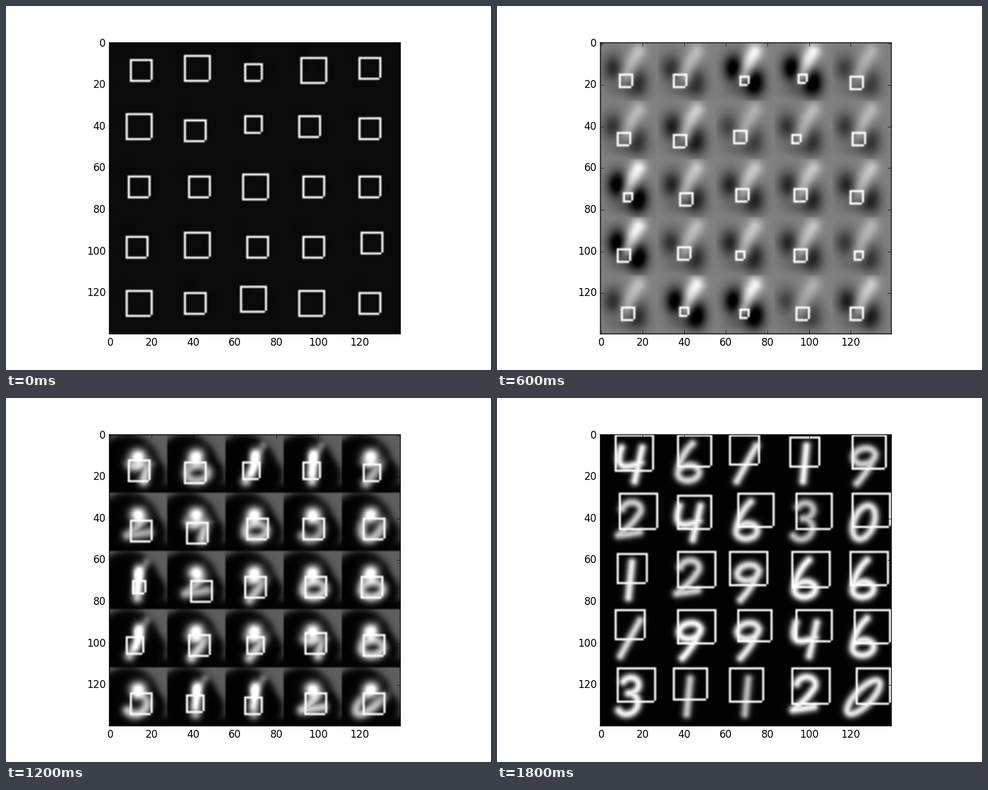
Recreate the animation shown at these times as a matplotlib script. Size 800 by 600 pixels, loop 2000 ms.

```python
import numpy as np
import matplotlib.pyplot as plt
from matplotlib.animation import FuncAnimation

plt.style.use("classic")
plt.rcParams.update({"font.family": "DejaVu Sans", "font.size": 12})

CELL, GRID, FRAMES = 28, 5, 10
Y, X = np.mgrid[0:CELL, 0:CELL].astype(float)
rng = np.random.default_rng(4)

# "/" is a leaning 1 and "O" a leaning 0
LABELS = "461/9" "24630" "12966" "/9946" "3112O"
LABELS = LABELS.replace("461/9", "46/19")


def bend(start, control, end):
    """Quadratic curve as sampled points."""
    t = np.linspace(0, 1, 40)[:, None]
    p, q, r = np.array([start, control, end], float)
    return (1 - t)**2 * p + 2 * t * (1 - t) * q + t**2 * r


def arc(cx, cy, rx, ry, start=0, end=360):
    a = np.radians(np.linspace(start, end, 60))
    return np.stack([cx + rx * np.cos(a), cy + ry * np.sin(a)], axis=1)


GLYPHS = {
    "0": [arc(14.5, 13.8, 5, 8)],
    "1": [bend((14, 5), (14, 13), (14, 22))],
    "2": [arc(14, 8, 4.5, 3.8, -170, 40), bend((17.5, 10.5), (15, 15), (9, 20)),
          bend((9, 20), (14, 19.5), (19, 18.5))],
    "3": [arc(13.5, 8.2, 4, 3.7, -150, 80), arc(13, 17, 5, 5, -90, 140)],
    "4": [bend((9, 6), (6, 19), (19, 13)), bend((19, 6), (18, 14), (17, 22))],
    "6": [bend((15, 4), (10, 9), (9.5, 17)), arc(14.5, 18, 5, 3.7)],
    "9": [arc(14, 10, 5, 3.8), bend((19, 9), (17.5, 17), (13, 23))],
}
GLYPHS["/"], GLYPHS["O"] = GLYPHS["1"], GLYPHS["0"]
SLANT = {"/": .55, "O": .75, "0": .25, "1": .1, "9": .2}


def distance2(*strokes):
    """Squared distance of every pixel to the nearest stroke point."""
    pts = np.vstack(strokes)
    dx = X[..., None] - pts[:, 0]
    dy = Y[..., None] - pts[:, 1]
    return (dx**2 + dy**2).min(axis=2)


def glow(d2, sigma):
    return np.exp(-d2 / (2 * sigma**2))


def blob(x, y, sx, sy):
    return np.exp(-((X - x) / sx)**2 / 2 - ((Y - y) / sy)**2 / 2)


def soft(v):
    return 1 / (1 + np.exp(-np.clip(v, -40, 40)))


def disc(x, y, radius):
    return soft((radius - np.hypot(X - x, Y - y)) / .9)


class Cell:
    def __init__(self, label):
        self.slim = label in "1/"
        lean = SLANT.get(label, .1)
        self.shape = distance2(*[
            np.stack([p[:, 0] + lean * (13.5 - p[:, 1]), p[:, 1]], axis=1)
            for p in GLYPHS[label]])
        self.ink = rng.uniform(.65, .9)
        self.strength = 1.2 if self.slim else rng.uniform(.45, .8)
        self.drift = rng.normal(0, .8, (3, 3))

    def window(self, step):
        """Left, top and size of the attention window."""
        def path(*values):
            return np.interp(step, (0, 1, 2, 3, 5, 7, 9), values)

        cx = path(13.4, 13.1, 12.4, 11.4, 13.4, 15.6, 17.5)
        cy = path(12.8, 12.7, 13.8, 17.8, 20, 14.5, 7.5)
        size = path(10.4, 8.8, 6.4, 5.5, 8.4, 10.5, 17.2)
        if self.slim:
            cx += path(0, .4, .8, 1.2, -.6, -2.3, -3.2)
            size -= path(0, .7, 1.4, 1.5, 2.4, 2.2, 3)
        dx, dy, ds = [np.interp(step, (0, 4, 9), d) for d in self.drift.T]
        size = 2 * round((size + ds) / 2)
        return round(cx + dx - size / 2), round(cy + dy - size / 2), size

    def early(self, step):
        """Flat grey with a bright streak between two dark lobes."""
        full = step == 3
        k = self.strength if full else self.strength**1.6
        base = (.04, .148, .39, .5)[step]
        amp = (.01, .15, .6, 1)[step] * k
        lift, grow = (0, 1.15) if full else (6, .85)
        streak = glow(distance2(bend((13, 15 - lift * .7), (14, 10 - lift * .7),
                                     (18, 4))), 2.3 * grow)
        left = 3.2 + 4 * self.strength + lift * .2
        dark = (blob(left, 12 - lift, 3 * grow, 4 * grow)
                + blob(17.8 + lift * .2, 18.5 - lift, 3 * grow, 4 * grow))
        img = base + amp * (.4 * streak - .52 * dark)
        if full:
            img -= .1 * blob(12, 23, 6, 2.2)
        return img

    def late(self, step):
        """Dark lobes fill the cell while the digit sharpens."""
        def at(*values):
            return np.interp(step, (5, 7, 9), values)

        left = disc(at(7, 10, 10), at(14, 15, 15), at(9.7, 20.5, 45))
        right, floor = disc(19, 19, 8), soft((Y - 23) / .9)
        img = at(.5, .22, 0) * (1 - left) * (1 - right) * (1 - floor)

        streak = glow(distance2(bend((12.5, 18), (13.5, 12), (17.5, 5))), 1.5)
        img += at(.8 if self.slim else .08, 0, 0) * streak
        sx, sy = (1.7, 2.6) if self.slim else (2.7, 2.6)
        head = blob(at(13, 13.8, 14), at(12.3, 8, 6), sx, sy)
        img += at(1.1, 1.1, 0) * head
        fade = soft((Y - at(16, 10, -20)) / 1.5)
        return img + at(.8, 1, 1.1) * self.ink * fade * glow(
            self.shape, at(2, 1.8, 1.5)) + .01

    def content(self, step):
        if step <= 3:
            img = self.early(step)
        elif step == 4:
            img = (np.clip(self.early(3), 0, 1) + np.clip(self.late(5), 0, 1)) / 2
        else:
            img = self.late(step)
        return np.clip(img, 0, 1)


def draw_box(img, left, top, size):
    """One-pixel outline whose last corner stays open."""
    x0, x1, y0, y1 = np.clip((left, left + size, top, top + size), 0, CELL - 1)
    img[y0, x0:x1] = img[y1, x0:x1] = 1
    img[y0:y1, x0] = img[y0:y1, x1] = 1


def mosaic(step):
    tiles = []
    for cell in cells:
        img = cell.content(step)
        draw_box(img, *cell.window(step))
        tiles.append(img)
    return np.vstack([np.hstack(tiles[i:i + GRID])
                      for i in range(0, GRID * GRID, GRID)])


cells = [Cell(label) for label in LABELS]
sheets = [mosaic(step) for step in range(FRAMES)]

fig = plt.figure(figsize=(8, 6), dpi=100, facecolor="white")
ax = fig.add_axes((170 / 800, 0.1, 0.6, 0.8))
view = ax.imshow(sheets[0], cmap="gray", vmin=0, vmax=1,
                 interpolation="bilinear")
ax.set_xticks(range(0, 140, 20))
ax.set_yticks(range(0, 140, 20))


def draw(step):
    view.set_data(sheets[step])
    return [view]


anim = FuncAnimation(fig, draw, frames=FRAMES, interval=200, repeat=True)
plt.show()
```
